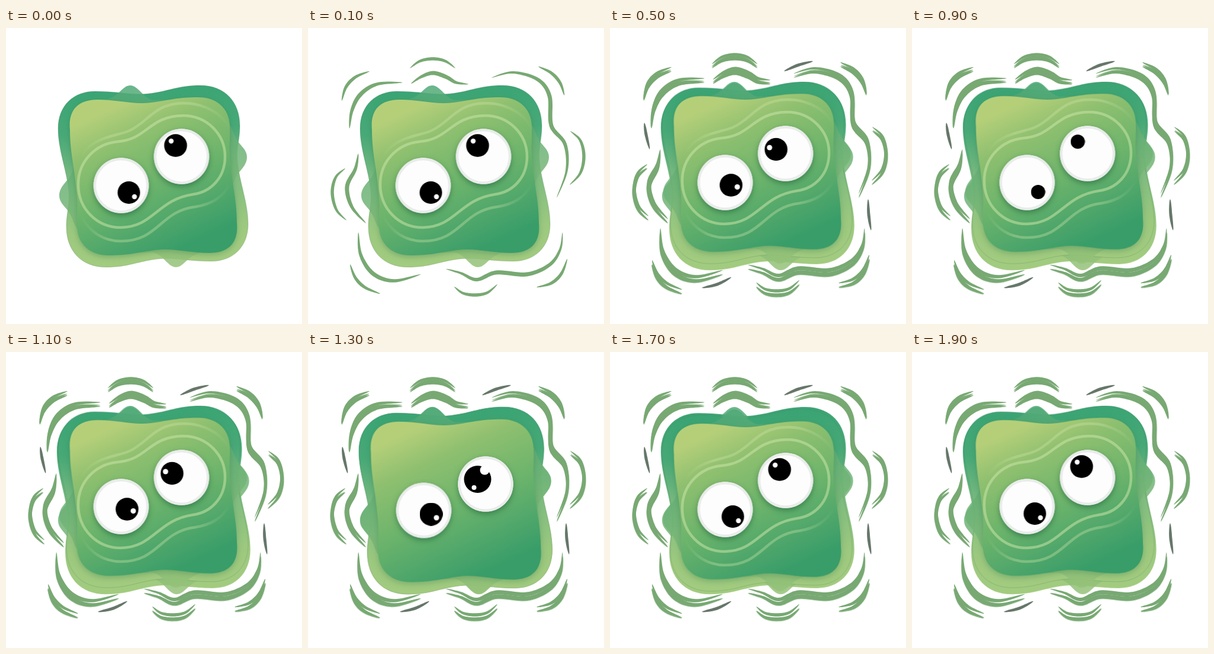
Write an HTML page that moves like this. It is 500 by 500 pixels and loops after 2.1 s.

```html
<!DOCTYPE html>
<html lang="en">
<head>
<meta charset="utf-8">
<title>Shaking blob</title>
<style>
html, body { margin: 0; width: 100%; height: 100%; overflow: hidden; background: #fff; }
svg { display: block; width: 100vw; height: 100vh; }

.pose, .eye, .from100, .from300, .from500, .rings, .look { animation: 2100ms step-end infinite; }
.pose { animation-name: pose; }
.left { animation-name: left; }
.right { animation-name: right; }
.rings { animation-name: rings; }
.from100 { animation-name: from100; }
.from300 { animation-name: from300; }
.from500 { animation-name: from500; }
.calm { animation-name: calm; }
.wide { animation-name: wide; }
.inward { animation-name: inward; }
.tiny { animation-name: tiny; }

@keyframes pose {
  0%, 71.428%, 80.952% { transform: none; }
  14.285%, 61.904% { transform: translate(250.3px, 251px) scale(1.018, 1.03) translate(-249.5px, -250.5px); }
  23.809%, 42.857%, 52.38%, 90.476%, 100% { transform: translate(0, -6px); }
}
@keyframes left {
  0%, 71.428% { transform: translate(194.5px, 266px); }
  14.285%, 61.904% { transform: translate(195.5px, 267.5px); }
  23.809%, 90.476%, 100% { transform: translate(194.5px, 261px); }
}
@keyframes right {
  0%, 71.428% { transform: translate(296.5px, 217px); }
  14.285%, 61.904% { transform: translate(300px, 223px); }
  23.809%, 90.476%, 100% { transform: translate(296.5px, 212px); }
}
@keyframes rings {
  0%, 23.809%, 71.428%, 100% { opacity: 1; }
  14.285%, 61.904% { opacity: 0; }
}
@keyframes from100 { 0% { opacity: 0; } 4.761%, 100% { opacity: 1; } }
@keyframes from300 { 0% { opacity: 0; } 14.285%, 100% { opacity: 1; } }
@keyframes from500 { 0% { opacity: 0; } 23.809%, 100% { opacity: 1; } }
@keyframes calm { 0%, 71.428%, 100% { opacity: 1; } 14.285% { opacity: 0; } }
@keyframes wide { 0%, 23.809%, 71.428%, 100% { opacity: 0; } 14.285%, 61.904% { opacity: 1; } }
@keyframes inward { 0%, 42.857%, 61.904%, 100% { opacity: 0; } 23.809%, 52.38% { opacity: 1; } }
@keyframes tiny { 0%, 52.38%, 100% { opacity: 0; } 42.857% { opacity: 1; } }

.face { filter: drop-shadow(0 3px 5px rgba(40, 110, 70, .32)); }
.ball { fill: #fdfdfd; filter: drop-shadow(0 4px 5px rgba(20, 85, 50, .5)); }
.rim { fill: none; stroke: #e9ecea; stroke-width: 4; }
.shine { fill: #fff; }
</style>
</head>
<body>
<svg viewBox="0 0 500 500">
  <defs>
    <linearGradient id="hullFill" gradientUnits="userSpaceOnUse" x1="240" y1="97" x2="258" y2="404">
      <stop offset="0" stop-color="#3aa474"/>
      <stop offset=".25" stop-color="#48a977"/>
      <stop offset=".5" stop-color="#7cbb80"/>
      <stop offset=".8" stop-color="#9dc97f"/>
      <stop offset="1" stop-color="#a3cc7f"/>
    </linearGradient>
    <linearGradient id="bumpFill" gradientUnits="userSpaceOnUse" x1="210" y1="97" x2="285" y2="404">
      <stop offset="0" stop-color="#50a977"/>
      <stop offset=".5" stop-color="#6fb376"/>
      <stop offset="1" stop-color="#95c278"/>
    </linearGradient>
    <linearGradient id="faceFill" gradientUnits="userSpaceOnUse" x1="230" y1="112" x2="340" y2="352">
      <stop offset="0" stop-color="#b5cf79"/>
      <stop offset=".22" stop-color="#8fc070"/>
      <stop offset=".55" stop-color="#6cb46c"/>
      <stop offset=".8" stop-color="#50a76b"/>
      <stop offset="1" stop-color="#389d69"/>
    </linearGradient>
    <linearGradient id="fade" gradientUnits="userSpaceOnUse" x1="125" y1="0" x2="380" y2="0">
      <stop offset="0" stop-color="#c9e3a6" stop-opacity="0"/>
      <stop offset=".2" stop-color="#c9e3a6" stop-opacity=".38"/>
      <stop offset=".75" stop-color="#c9e3a6" stop-opacity=".38"/>
      <stop offset="1" stop-color="#c9e3a6" stop-opacity="0"/>
    </linearGradient>
    <g id="strokes" fill="#78a973"></g>
    <path id="hull" fill="url(#hullFill)"/>
    <path id="bumps" fill="url(#bumpFill)" fill-opacity=".85"/>
    <g id="ball"><circle class="ball" r="46.7"/><circle class="rim" r="44.5"/></g>
  </defs>

  <use href="#strokes" class="from100"/>
  <g class="from300"><use href="#strokes" transform="translate(-1 -3) scale(1.004 1.009)"/></g>
  <g class="from500">
    <use href="#strokes" transform="translate(0 -7)"/>
    <g id="specks" fill="#66776a"></g>
  </g>

  <g class="from300">
    <g transform="translate(250.3 251) scale(1.018 1.03) translate(-249.5 -250.5)">
      <use href="#hull"/><use href="#bumps"/>
    </g>
  </g>

  <g class="pose">
    <g stroke="#4c7a58" stroke-opacity=".45" stroke-width=".6">
      <use href="#hull"/>
    </g>
    <use href="#bumps"/>
    <path id="face" class="face" fill="url(#faceFill)"/>
    <g class="rings" fill="none" stroke-linecap="round">
      <path stroke="#c9e3a6" stroke-opacity=".55" stroke-width="4.5"
        d="M122 264C122 226 150 196 188 192C240 188 240 149 299 148C340 148 370 180 370 217C370 254 345 277 316 281C255 290 250 336 194 337C153 337 122 305 122 264Z"/>
      <g stroke="url(#fade)" stroke-width="4.5">
        <path d="M128 215C147 184 185 183 207 174C240 160 250 127 300 127C337 127 370 147 380 175"/>
        <path d="M127 318C141 345 165 360 194 360C258 360 260 309 320 302C345 298 365 288 378 264"/>
      </g>
    </g>
  </g>

  <g class="eye left">
    <use href="#ball"/>
    <g class="look calm"><circle cx="13" cy="12" r="19"/><circle class="shine" cx="22.5" cy="19" r="4.2"/></g>
    <g class="look wide"><circle cx="12.5" cy="6.5" r="19.5"/><circle class="shine" cx="21.5" cy="12.5" r="4.5"/></g>
    <g class="look inward"><circle cx="10" cy="4.5" r="19.3"/><circle class="shine" cx="20.5" cy="7.5" r="4.5"/></g>
    <circle class="look tiny" cx="18.5" cy="16" r="12"/>
  </g>
  <g class="eye right">
    <use href="#ball"/>
    <g class="look calm"><circle cx="-10" cy="-18.5" r="19.3"/><circle class="shine" cx="-17.5" cy="-26" r="4.2"/></g>
    <g class="look wide"><circle cx="-13.5" cy="-8" r="23"/><circle class="shine" cx="-1.5" cy="-23.5" r="8"/><circle class="shine" cx="-19.5" cy="6" r="4"/></g>
    <g class="look inward"><circle cx="-16" cy="-7" r="19.3"/><circle class="shine" cx="-27" cy="-10" r="4.5"/></g>
    <circle class="look tiny" cx="-16.5" cy="-20" r="12"/>
  </g>
</svg>
<script>
const el = id => document.getElementById(id);
const parse = s => s.trim().split(/\s+/).map(p => p.split(',').map(Number));

// Closes half an outline with its half-turn copy; sx, sy are twice the centre.
function halfTurn(id, sx, sy, half) {
  const pts = parse(half);
  const rest = pts.slice(1);
  const turned = rest.map(([x, y]) => [sx - x, sy - y]);
  el(id).setAttribute('d', `M${pts[0]}C${rest.concat(turned).join(' ')}Z`);
}

halfTurn('hull', 497, 501, `88,170 88,130 115,107 150,107 190,107 215,114 240,111
  275,107 290,97 328,97 370,97 395,125 395,165 395,190 389,200 391,225 394,260 409,295 409,331`);
halfTurn('bumps', 497, 501, `250,122 232,120 224,97 210,97 197,97 192,114 172,120
  140,133 122,185 114,235 110,258 90,264 90,283 90,298 104,302 112,322 124,360 165,384 247,379`);
halfTurn('face', 498, 501, `108,172 105,140 120,121 155,121 190,121 215,130 245,126
  275,122 290,117 325,117 355,117 377,135 378,165 379,190 376,200 379,225 382,265 390,290 390,329`);

// Smooth brush stroke through the points, thin at both ends.
function brush(points, width) {
  const p = parse(points), n = p.length - 1, steps = n * 10;
  const at = u => {
    const i = Math.min(n - 1, Math.floor(u)), t = u - i;
    const [a, b, c, d] = [p[Math.max(0, i - 1)], p[i], p[i + 1], p[Math.min(n, i + 2)]];
    return [0, 1].map(k => b[k] + t / 2 * (c[k] - a[k] + t * (2 * a[k] - 5 * b[k] + 4 * c[k] - d[k]
      + t * (3 * (b[k] - c[k]) + d[k] - a[k]))));
  };
  const one = [], two = [];
  for (let s = 0; s <= steps; s++) {
    const u = s / steps * n;
    const [x, y] = at(u), [ax, ay] = at(Math.max(0, u - .05)), [bx, by] = at(Math.min(n, u + .05));
    const len = Math.hypot(bx - ax, by - ay) || 1;
    const w = width / 2 * Math.pow(Math.max(0, Math.sin(Math.PI * s / steps)), .7);
    const nx = (ay - by) / len * w, ny = (bx - ax) / len * w;
    one.push([(x + nx).toFixed(1), (y + ny).toFixed(1)]);
    two.unshift([(x - nx).toFixed(1), (y - ny).toFixed(1)]);
  }
  return `<path d="M${one.concat(two).join(' ')}Z"/>`;
}
const draw = (id, list, width) => { el(id).innerHTML += list.map(s => brush(s, width)).join(''); };

draw('strokes', [
  '172,68 189,56 211,52 232,56 249,68',
  '57,123 64,100 80,83 104,73',
  '389,65 411,76 426,93 433,114',
  '443,174 460,190 466,217 460,245 442,265',
  '63,237 47,252 41,278 48,307 65,325',
  '71,399 80,422 96,438 122,449',
  '247,437 262,448 283,451 303,447 320,433',
  '386,438 411,431 428,415 438,390'
], 5.5);
draw('strokes', [
  '174,94 192,82 212,76 234,83 250,92 271,95',
  '70,170 74,140 88,113 116,95 160,92',
  '310,84 346,75 388,87 408,115 411,165 434,196 437,240 420,287',
  '85,212 80,238 66,268 74,302 98,330',
  '85,345 89,383 110,415 145,427 191,416',
  '233,407 258,414 285,425 318,413 370,416 408,400 426,374 430,345'
], 7);
draw('specks', [
  '58,160 61,180 67,205',
  '436,289 437,315 441,342',
  '294,73 317,63 343,56',
  '155,439 181,433 205,421'
], 5);
</script>
</body>
</html>
```
